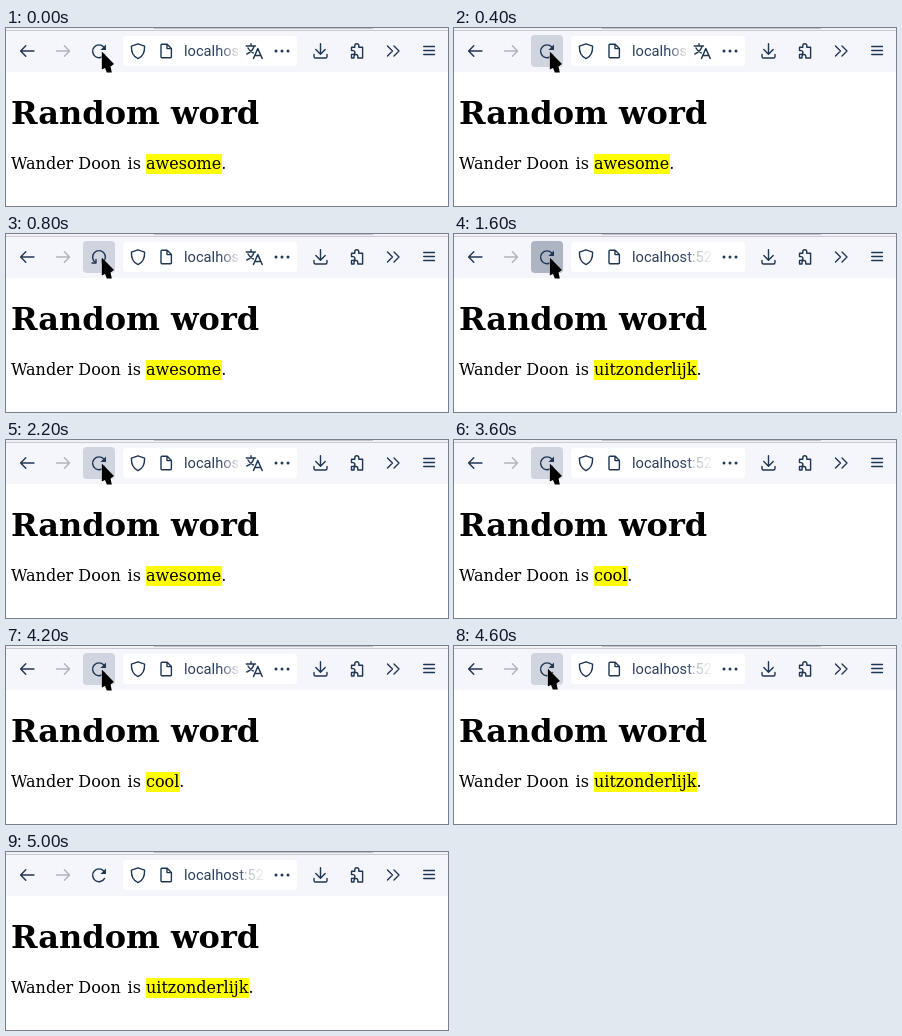
Animation, 442 px wide and 178 px high, one loop 5.2 s. Source, as an HTML page with a canvas:

```html
<!DOCTYPE html>
<html lang="nl">
<head>
<meta charset="utf-8">
<title>Random word</title>
<style>
  html, body { margin: 0; width: 100%; height: 100%; overflow: hidden; background: #fff; }
  #stage { position: relative; width: 442px; height: 178px; overflow: hidden;
           font-family: "DejaVu Serif", serif; color: #000; }
  canvas { position: absolute; left: 0; top: 0; }
  h1, p { position: absolute; left: 5px; margin: 0; white-space: pre; }
  h1 { top: 67px; font-size: 32px; line-height: 37px; }
  p { top: 126px; font-size: 16px; line-height: 19px; }
  #subject { width: 135px; display: flex; justify-content: space-between; }
  #result { left: 140px; }
  mark { background: #ff0; color: #000; padding: 0 1px 1px 0; margin-right: -1px; }
  #url { position: absolute; left: 178px; top: 14px; overflow: hidden; white-space: pre;
         font: 14.67px/19px Roboto, sans-serif; color: #2c3e5c; }
  #url span { color: #7f879a; }
</style>
</head>
<body>
<div id="stage">
  <canvas id="bar" width="442" height="178"></canvas>
  <div id="url">localhost<span>:5200</span></div>
  <h1>Random word</h1>
  <p id="subject"><span>Wander Doon</span><span>is </span></p>
  <p id="result"><mark id="word">awesome</mark>.</p>
  <canvas id="pointer" width="442" height="178"></canvas>
</div>
<script>
const LOOP = 5200;
const INK = '#1f3654';
const $ = id => document.getElementById(id);
const bar = $('bar').getContext('2d');
const top2d = $('pointer').getContext('2d');

// Each track: [start time, value]
const words = [[0, 'awesome'], [1000, 'uitzonderlijk'], [1800, 'awesome'],
               [2800, 'de beste'], [3600, 'cool'], [4400, 'uitzonderlijk']];
const translate = [[0, true], [1000, false], [2200, true], [2800, false],
                   [3000, true], [3600, false], [3800, true], [4400, false]];
const button = [[0, ''], [400, '#d0d4de'], [600, '#adb4c2'], [800, '#d0d4de'],
                [1600, '#adb4c2'], [1800, '#d0d4de'], [4800, '']];
const loading = [[0, false], [800, true], [1000, false]];
const cursor = [[0, [95, 23]], [4600, [93, 22]], [4800, [100, 1]], [5000, null]];

function at(track, t) {
  let value;
  for (const [start, v] of track) if (t >= start) value = v;
  return value;
}

function line(d, color = INK, width = 1.4) {
  bar.strokeStyle = color;
  bar.lineWidth = width;
  bar.stroke(new Path2D(d));
}

function fill(d, color = INK) {
  bar.fillStyle = color;
  bar.fill(new Path2D(d));
}

function box(x, y, w, h, r, color) {
  bar.fillStyle = color;
  bar.beginPath();
  bar.roundRect(x, y, w, h, r);
  bar.fill();
}

function drawReload(busy) {
  if (busy) {
    line('M89.2 28.2A6.4 6.4 0 1 1 96.8 28.2');
    line('M86 29H90V25.5M100 29H96V25.5');
  } else {
    line('M98.6 26.4A6.4 6.4 0 1 1 97.8 19');
    fill('M100 16.4V22H94.4Z');
  }
}

function drawTranslate() {
  line('M240.3 18H249.5M245 15.6V18M248 18.2C247 22 244.5 24.5 240.8 26M242 20C243.2 22.5 245 24 247.3 25');
  line('M247.5 30.5L251.8 20.5L256.2 30.5M249 27.5H254.7', INK, 1.5);
}

function drawBar(t) {
  bar.clearRect(0, 0, 442, 178);
  bar.lineCap = bar.lineJoin = 'round';
  box(0, 0, 442, 44, 0, '#f5f6fb');
  box(0, 0, 442, 2, 0, '#f0f0f5');
  box(148, 0, 219, 1, 0, '#c4c3cc');
  box(0, 2, 442, 1, 0, '#cbc9d3');

  line('M28 23H14.6M19.8 17.8L14.6 23L19.8 28.2');
  line('M50.5 23H63.6M58.4 17.8L63.6 23L58.4 28.2', '#b0b3bf');

  const shade = at(button, t);
  if (shade) box(77, 7, 32, 32, 4, shade);
  drawReload(at(loading, t));

  box(117, 8, 174, 30, 4, '#fff');
  line('M132 15.8L138.6 18.2C138.8 24 137 28.4 132 30.6C127 28.4 125.2 24 125.4 18.2Z');
  line('M155 17.2Q155 16.2 156 16.2H161.2L165.4 20.4V28.8Q165.4 29.8 164.4 29.8H156Q155 29.8 155 28.8ZM161 16.4V20.6H165.2');
  if (at(translate, t)) drawTranslate();
  for (const x of [270, 276, 282]) box(x - 1.5, 21.5, 3, 3, 1.5, INK);

  line('M314.5 15.6V26M309.8 21.6L314.5 26.3L319.2 21.6');
  line('M308 26.5V28.5Q308 30 309.5 30H319.5Q321 30 321 28.5V26.5');
  line('M345.5 19.2H348.8V17.8A2 2 0 0 1 352.8 17.8V19.2H356.6V30H351.8V28.4A1.9 1.9 0 0 0 348 28.4V30H345.5V26.4H347A1.9 1.9 0 0 0 347 22.6H345.5Z');
  line('M381.5 18L386.5 23L381.5 28M388 18L393 23L388 28');
  line('M417.7 18.5H428.5M417.7 22.5H428.5M417.7 26.5H428.5', INK, 1.3);
}

function drawCursor(pos) {
  top2d.clearRect(0, 0, 442, 178);
  if (!pos) return;
  top2d.save();
  top2d.translate(...pos);
  const arrow = new Path2D('M.8 .5V18.5L4 17L5.8 21.5H10.8L9.6 15.5L13 13Z');
  top2d.lineWidth = 1;
  top2d.strokeStyle = 'rgba(255,255,255,.7)';
  top2d.stroke(arrow);
  top2d.fillStyle = '#000';
  top2d.fill(arrow);
  top2d.restore();
}

function frame() {
  const t = performance.now() % LOOP;
  const word = at(words, t);
  if ($('word').textContent !== word) $('word').textContent = word;

  const short = at(translate, t);
  const fade = `linear-gradient(to left, transparent, #000 ${short ? 22 : 30}px)`;
  $('url').style.width = short ? '57px' : '82px';
  $('url').style.maskImage = $('url').style.webkitMaskImage = fade;

  drawBar(t);
  drawCursor(at(cursor, t));
  requestAnimationFrame(frame);
}
frame();
</script>
</body>
</html>
```
